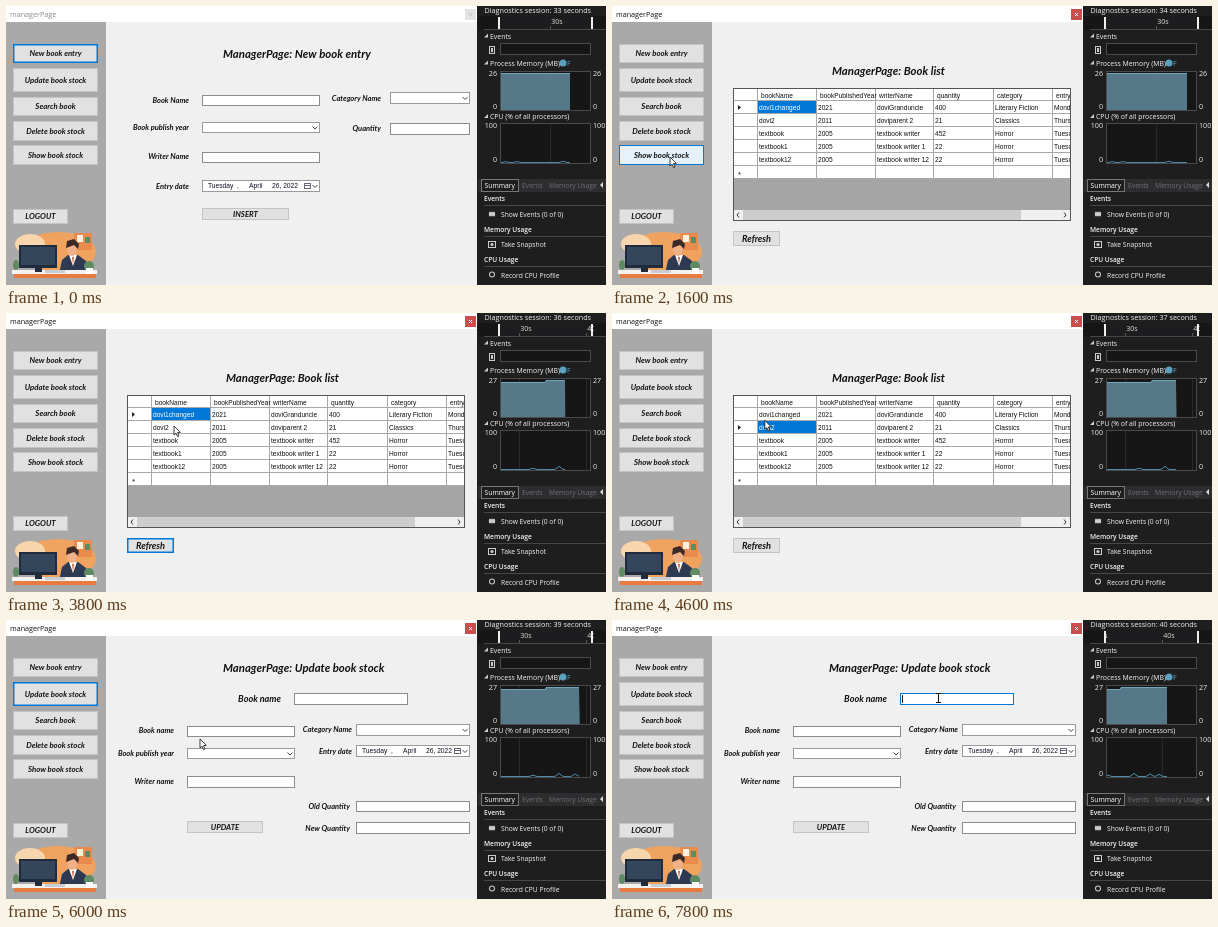
Recreate the animation shown at these times as an HTML page with a canvas. Size 600 px wide and 279 px high, loop 8 s.

```html
<!DOCTYPE html>
<html lang="en">
<head>
<meta charset="utf-8">
<title>Book manager</title>
<style>
html, body { margin: 0; width: 100%; height: 100%; overflow: hidden; background: #f0f0f0; }
canvas { display: block; width: 600px; height: 279px; }
</style>
</head>
<body>
<canvas id="stage" width="600" height="279"></canvas>
<script>
const ctx = document.getElementById('stage').getContext('2d');
const LOOP = 8000, STEP = 200;
const BLUE = '#0078d7';
const sans = size => `${size}px "Liberation Sans", Arial, sans-serif`;
const ui = (size, weight = 400) => `${weight} ${size}px "Open Sans", "Noto Sans", sans-serif`;
const script = size => `italic 700 ${size}px Lato, cursive`;

// Time in ms, then pointer position.
const pointerPath = [
  [0, 180, 285], [800, 90, 180], [1200, 58, 151], [1800, 58, 151],
  [2600, 184, 114], [3000, 146, 230], [3200, 146, 230], [3800, 168, 113],
  [4400, 168, 113], [5200, 71, 77], [5600, 71, 77], [6000, 194, 119],
  [6600, 210, 111], [7200, 210, 111], [7600, 326, 78], [LOOP, 326, 78]
];
const focusTimes = [
  [0, 'New book entry'], [1200, 'Show book stock'], [3200, 'Refresh'], [4200, 'grid'],
  [5600, 'Update book stock'], [6800, 'name'], [7600, 'search']
];
let pointer, focus, overField;

const lastBefore = (list, t) => list.filter(item => item[0] <= t).pop();

function pointerAt(t) {
  const i = pointerPath.findIndex(p => p[0] > t);
  const [t0, x0, y0] = pointerPath[i - 1], [t1, x1, y1] = pointerPath[i];
  const k = (t - t0) / (t1 - t0), e = k * k * (3 - 2 * k);
  return [x0 + (x1 - x0) * e, y0 + (y1 - y0) * e];
}

function fill(color, x1, y1, x2, y2) {
  ctx.fillStyle = color;
  ctx.fillRect(x1, y1, x2 - x1, y2 - y1);
}

function outline(color, x1, y1, x2, y2, width = 1) {
  ctx.strokeStyle = color;
  ctx.lineWidth = width;
  ctx.strokeRect(x1 + width / 2, y1 + width / 2, x2 - x1 - width, y2 - y1 - width);
}

function text(value, x, y, font, color = '#111', align = 'left') {
  ctx.font = font;
  ctx.fillStyle = color;
  ctx.textAlign = align;
  ctx.fillText(value, x, y);
}

function line(color, width, ...points) {
  ctx.strokeStyle = color;
  ctx.lineWidth = width;
  ctx.beginPath();
  points.forEach(([x, y]) => ctx.lineTo(x, y));
  ctx.stroke();
}

function shape(color, ...points) {
  ctx.fillStyle = color;
  ctx.beginPath();
  points.forEach(([x, y]) => ctx.lineTo(x, y));
  ctx.fill();
}

function oval(color, x, y, rx, ry = rx) {
  ctx.fillStyle = color;
  ctx.beginPath();
  ctx.ellipse(x, y, rx, ry, 0, 0, 7);
  ctx.fill();
}

const hovered = (x1, y1, x2, y2) =>
  pointer[0] >= x1 && pointer[0] < x2 && pointer[1] >= y1 && pointer[1] < y2;

function button(label, x1, y1, x2, y2, size = 7.8) {
  const hot = hovered(x1, y1, x2, y2), active = focus === label;
  fill(hot ? '#e5f1fb' : '#e1e1e1', x1, y1, x2, y2);
  outline(hot || active ? BLUE : '#c4c4c4', x1, y1, x2, y2, active && !hot ? 1.5 : 1);
  text(label, (x1 + x2) / 2, (y1 + y2) / 2 + size * 0.33, script(size), '#111', 'center');
}

function field(x1, y1, x2, y2, id) {
  fill('#fff', x1, y1, x2, y2);
  outline(id && focus === id ? BLUE : '#8c8c8c', x1, y1, x2, y2);
  overField ||= hovered(x1, y1, x2, y2);
  if (id && focus === id) fill('#222', x1 + 2, y1 + 2, x1 + 3, y2 - 2);
}

const chevron = (x, y) => line('#444', 1, [x - 2.5, y - 1], [x, y + 1.5], [x + 2.5, y - 1]);

function combo(x1, y1, x2, y2) {
  fill('#fff', x1, y1, x2, y2);
  outline('#999', x1, y1, x2, y2);
  chevron(x2 - 5, (y1 + y2) / 2);
}

function datePicker(x1, y1, x2, y2) {
  combo(x1, y1, x2, y2);
  [['Tuesday', 6], [',', 35], ['April', 47], ['26, 2022', 70]].forEach(
    ([part, dx]) => text(part, x1 + dx, y2 - 4, sans(6.7), '#112'));
  outline('#667', x2 - 16, y1 + 3, x2 - 9, y2 - 3);
  line('#667', 1, [x2 - 15, y1 + 5.5], [x2 - 10, y1 + 5.5]);
}

const label = (value, right, y, size = 7.5) => text(value, right, y, script(size), '#111', 'right');
const heading = (value, x, y) => text(value, x, y, script(11.4));

function deskScene() {
  oval('#f0a25f', 52, 246, 38, 20);
  oval('#f8d6ad', 24, 238, 15, 10);
  fill('#e88b4d', 68, 227, 86, 244);
  fill('#fff0de', 71, 229, 77, 236);
  fill('#5f8b62', 79, 231, 84, 237);
  shape('#2d3a52', [53, 268], [56, 254], [62, 249], [72, 249], [80, 255], [85, 268]);
  shape('#fff', [63, 249], [71, 249], [67, 260]);
  shape('#d65f38', [66, 251], [68, 251], [67, 259]);
  oval('#f0b088', 66, 243, 5, 7);
  shape('#3c2a29', [60, 242], [61, 235], [68, 233], [73, 238], [72, 243], [68, 239]);
  fill('#f4f2ef', 6, 264, 91, 268);
  fill('#e77b40', 8, 268, 90, 272);
  fill('#202b3b', 13, 239, 51, 262);
  fill('#34465c', 15, 241, 49, 259);
  fill('#202b3b', 29, 262, 36, 266);
  fill('#c8cdd4', 39, 264, 59, 267);
  oval('#5f8b62', 83, 260, 5);
  fill('#fff', 80, 262, 87, 268);
  oval('#5f8b62', 10, 259, 3, 5);
}

function sidebar() {
  fill('#a9a9a9', 0, 16, 100, 279);
  button('New book entry', 7, 38, 92, 57);
  button('Update book stock', 7, 62, 92, 86);
  button('Search book', 7, 91, 92, 110);
  button('Delete book stock', 7, 115, 92, 135);
  button('Show book stock', 7, 139, 92, 159);
  button('LOGOUT', 7, 203, 62, 218);
  deskScene();
}

function newEntryPage() {
  heading('ManagerPage: New book entry', 217, 52);
  label('Book Name', 183, 96.5);
  field(196, 89, 314, 100);
  label('Book publish year', 183, 123.5);
  combo(196, 116, 314, 127);
  label('Writer Name', 183, 153);
  field(196, 146, 314, 157);
  label('Entry date', 183, 183);
  datePicker(196, 174, 314, 186);
  label('Category Name', 375, 95);
  combo(384, 86, 464, 98);
  label('Quantity', 375, 125);
  field(384, 117, 464, 129);
  button('INSERT', 196, 202, 283, 214);
}

function updatePage() {
  heading('ManagerPage: Update book stock', 217, 52);
  label('Book name', 275, 82, 9.1);
  field(288, 73, 402, 85, 'search');
  label('Book name', 168, 113);
  field(181, 106, 289, 117, 'name');
  label('Book publish year', 168, 136);
  combo(181, 128, 289, 139);
  label('Writer name', 168, 164);
  field(181, 156, 289, 168);
  label('Category Name', 346, 112);
  combo(350, 104, 464, 116);
  label('Entry date', 346, 133.5);
  datePicker(350, 125, 464, 137);
  label('Old Quantity', 344, 189);
  field(350, 181, 464, 192);
  label('New Quantity', 344, 211);
  field(350, 202, 464, 214);
  button('UPDATE', 181, 201, 257, 213);
}

const columns = [146, 205, 264, 322, 382, 441];
const books = [
  ['bookName', 'bookPublishedYear', 'writerName', 'quantity', 'category', 'entry'],
  ['dovi1changed', '2021', 'doviGranduncle', '400', 'Literary Fiction', 'Mond'],
  ['dovi2', '2011', 'doviparent 2', '21', 'Classics', 'Thurs'],
  ['textbook', '2005', 'textbook writer', '452', 'Horror', 'Tuesc'],
  ['textbook1', '2005', 'textbook writer 1', '22', 'Horror', 'Tuesc'],
  ['textbook12', '2005', 'textbook writer 12', '22', 'Horror', 'Tuesc']
];

function listPage(selected) {
  heading('ManagerPage: Book list', 220, 69);
  ctx.save();
  ctx.beginPath();
  ctx.rect(121, 82, 338, 133);
  ctx.clip();
  fill('#a5a5a5', 121, 82, 459, 215);
  fill('#fff', 121, 83, 459, 172);
  const top = 95 + (selected - 1) * 13;
  fill(BLUE, 146, top, 205, top + 13);
  for (let y = 94; y <= 172; y += 13) fill('#a8a8a8', 121, y, 459, y + 1);
  columns.forEach(x => fill('#a8a8a8', x - 1, 83, x, 172));
  books.forEach((row, r) => row.forEach((cell, c) => text(
    cell, columns[c] + (r ? 1 : 3), 91.5 + r * 13 - (r ? 0.5 : 0), sans(6.6),
    r === selected && !c ? '#fff' : '#111')));
  shape('#222', [126, top + 4], [129, top + 6.5], [126, top + 9]);
  text('*', 126, 171, sans(8));
  fill('#f0f0f0', 121, 204, 459, 214);
  fill('#cdcdcd', 131, 204, 409, 214);
  line('#333', 1, [127, 206.5], [125, 209], [127, 211.5]);
  line('#333', 1, [452, 206.5], [454, 209], [452, 211.5]);
  outline('#555', 121, 82, 459, 215);
  ctx.restore();
  button('Refresh', 121, 225, 168, 240, 9.2);
}

function formWindow(t) {
  fill('#f0f0f0', 0, 0, 471, 279);
  fill('#fff', 0, 0, 471, 16);
  const active = t >= 200, cross = active ? '#fff' : '#c4c4c4';
  text('managerPage', 4, 10.5, ui(7.2), active ? '#111' : '#888');
  fill(active ? '#c94f4f' : '#e1e4e1', 459, 3, 470, 14);
  line(cross, 1, [463, 7], [466, 10]);
  line(cross, 1, [466, 7], [463, 10]);
  sidebar();
  if (t < 1200) newEntryPage();
  else if (t < 5600) listPage(t < 4200 ? 1 : 2);
  else updatePage();
}

// The charts jump left whenever the trace nears their right edge.
function timeline(t) {
  const s = t / 1000;
  if (s < 3) return { edge: 564 + 6.9 * s, shift: 0, mark: 551 };
  if (s < 7) return { edge: 554 + 6.6 * (s - 3), shift: 30, mark: 520 };
  return { edge: 550 + 6.3 * (s - 7), shift: 61, mark: 490 };
}

const cpuBumps = [[500, 0.8], [511, 0.8], [557, 1.2], [583, 3], [599, 2.5], [608, 2]];

function trace(edge, shift, heightAt) {
  const points = [];
  for (let x = 495; x <= edge; x++) points.push([x, heightAt(x + shift)]);
  return points;
}

function chart(y1, y2, max, mark) {
  fill('#161617', 494, y1, 585, y2);
  [mark - 7, mark + 60].filter(x => x > 494 && x < 584)
    .forEach(x => fill('#29292b', x, y1, x + 1, y2));
  outline('#4a4a4d', 494, y1, 585, y2);
  [[max, y1 + 5], ['0', y2 - 2.5]].forEach(([value, y]) => {
    text(value, 491, y, ui(7.2), '#eee', 'right');
    text(value, 587, y, ui(7.2), '#eee');
  });
}

function chartTitle(value, y) {
  shape('#ccc', [482, y - 5], [482, y - 1], [478, y - 1]);
  text(value, 484, y, ui(6.9, 500), '#f4f4f4');
}

function ruler(mark) {
  fill('#161617', 472, 10, 600, 24);
  fill('#1d1d1f', 494, 10, 585, 24);
  ctx.save();
  ctx.beginPath();
  ctx.rect(494, 10, 94, 14);
  ctx.clip();
  [['30s', mark], ['40s', mark + 67]].forEach(([value, x]) => {
    text(value, x, 17.5, ui(7), '#ddd', 'center');
    fill('#555', x - 7, 20, x - 6, 24);
  });
  ctx.restore();
  fill('#47474a', 478, 23, 600, 24);
  fill('#eee', 492, 11, 494, 23);
  fill('#eee', 585, 11, 587, 23);
}

function summary() {
  fill('#2d2d30', 472, 173, 600, 186);
  fill('#1e1e1f', 475, 173, 513, 186);
  outline('#77777a', 475, 173, 513, 186);
  text('Summary', 478.5, 182, ui(6.8), '#fff');
  text('Events', 516, 182, ui(6.8), '#707073');
  text('Memory Usage', 543, 182, ui(6.8), '#707073');
  shape('#ddd', [597, 176], [597, 182], [594, 179]);
  [['Events', 'Show Events (0 of 0)'], ['Memory Usage', 'Take Snapshot'], ['CPU Usage', 'Record CPU Profile']]
    .forEach(([group, action], i) => {
      const y = 195 + i * 30.5;
      text(group, 478, y, ui(6.6, 600), '#f6f6f6');
      fill('#47474a', 478, Math.round(y + 4), 600, Math.round(y + 5));
      text(action, 495, y + 15.5, ui(6.7, 500), '#f4f4f4');
    });
  [484, 486, 488].forEach(x => oval('#ccc', x, 208, 1.2, 2.5));
  outline('#ccc', 482, 235, 490, 242);
  oval('#ccc', 486, 238.5, 1.6);
  oval('#ccc', 486, 268.5, 3);
  oval('#1e1e1f', 486, 268.5, 2);
}

function diagnostics(t) {
  const { edge, shift, mark } = timeline(t);
  fill('#1e1e1f', 471, 0, 600, 279);
  text(`Diagnostics session: ${33 + Math.floor(t / 1000)} seconds`, 478.5, 7, ui(7.2, 500), '#f4f4f4');
  ruler(mark);
  chartTitle('Events', 32.5);
  fill('#161617', 494, 37, 585, 49);
  outline('#4a4a4d', 494, 37, 585, 49);
  outline('#ccc', 483, 40, 489, 48);
  fill('#ccc', 485, 42, 487, 46);

  chartTitle('Process Memory (MB)', 59.5);
  oval('#5aa0bf', 557, 57, 3.5);
  text('F', 561, 60, ui(7), '#5aa0bf');
  const rescaled = t >= 2000;
  chart(65, 105, rescaled ? '27' : '26', mark);
  const memory = trace(edge, shift, u => rescaled && u < 570 ? 69.5 : 67.5);
  shape('#567989', [495, 104], ...memory, [edge, 104]);
  line('#72a6bb', 1, ...memory);

  chartTitle('CPU (% of all processors)', 113);
  chart(117, 158, '100', mark);
  line('#4f8ca8', 1, ...trace(edge, shift, u =>
    156.5 - cpuBumps.reduce((sum, [x, h]) => sum + h * Math.exp(-(((u - x) / 2.5) ** 2)), 0)));
  summary();
}

function drawPointer() {
  const [x, y] = pointer;
  if (overField) {
    line('#111', 1, [x - 2, y - 4.5], [x + 3, y - 4.5]);
    line('#111', 1, [x + 0.5, y - 4.5], [x + 0.5, y + 4.5]);
    line('#111', 1, [x - 2, y + 4.5], [x + 3, y + 4.5]);
    return;
  }
  const arrow = [[0, 0], [0, 9], [2, 7.2], [3.6, 10.6], [5, 10], [3.5, 6.6], [6.3, 6.4], [0, 0]]
    .map(([dx, dy]) => [x + dx, y + dy]);
  shape('#fff', ...arrow);
  line('#111', 0.8, ...arrow);
}

function draw(now) {
  const t = Math.floor(now % LOOP / STEP) * STEP;
  pointer = pointerAt(t);
  focus = lastBefore(focusTimes, t)[1];
  overField = false;
  formWindow(t);
  diagnostics(t);
  drawPointer();
}

const start = performance.now();
function tick() {
  draw(performance.now() - start);
  requestAnimationFrame(tick);
}
tick();
</script>
</body>
</html>
```
